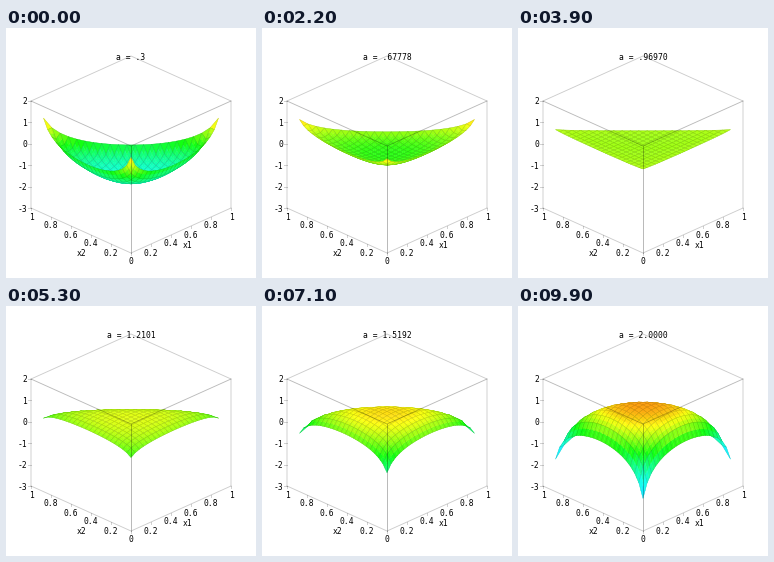
Recreate the animation shown at these times as a matplotlib script. Size 250 px wide and 250 px high, loop 10000 ms.

```python
from math import lgamma

import matplotlib.pyplot as plt
import numpy as np
from matplotlib.animation import FuncAnimation
from matplotlib.collections import PolyCollection
from matplotlib.colors import hsv_to_rgb

SIZE, DPI = 250, 100
PX = 72 / DPI  # one pixel in points
N = 24         # grid cells along each axis
FRAMES = 100
A_MIN, A_MAX = 0.3, 2.0
Z_MIN, Z_MAX = -3, 2

plt.rcParams["font.family"] = "DejaVu Sans Mono"


def project(x1, x2, z):
    """Orthographic view along the diagonal, in pixels."""
    return 125 + 100 * (x1 - x2), 225 - 45 * (x1 + x2) - 21.4 * (z - Z_MIN)


def log_density(a, x1, x2):
    """Log of the symmetric Dirichlet density with three components."""
    const = lgamma(3 * a) - 3 * lgamma(a)
    return const + (a - 1) * np.log(x1 * x2 * (1 - x1 - x2))


def color(z):
    """Orange for high values through green to cyan for low ones."""
    hue = (95 - 110 * np.tanh(0.62 * (z - 0.5))) / 360
    return (*hsv_to_rgb((hue, 0.93, 1)), 1)


# Cells inside the simplex, farthest first; those on the rim are triangles.
cells = []
for s in range(N - 2, 1, -1):
    for i in range(1, s):
        j = s - i
        corners = [(i, j), (i + 1, j), (i + 1, j + 1), (i, j + 1)]
        if s + 2 >= N:
            del corners[2]
        cells.append(np.array(corners) / N)


def surface(a):
    """Filled pieces and outlines of all cells, in painting order."""
    verts, faces, edges = [], [], []
    for c in cells:
        z = log_density(a, c[:, 0], c[:, 1])
        pts = np.column_stack([*project(c[:, 0], c[:, 1], z), z])
        if len(c) == 4:
            mid = pts.mean(axis=0)
            half = (pts + np.roll(pts, -1, axis=0)) / 2
            parts = [np.array([pts[k], half[k], mid, half[k - 1]])
                     for k in range(4)]
        else:
            parts = [pts]
        for p in parts:
            rgba = color(p[:, 2].mean())
            verts.append(p[:, :2])
            faces.append(rgba)
            edges.append(rgba)
        verts.append(pts[:, :2])
        faces.append((0, 0, 0, 0))
        edges.append((0, 0, 0, 0.2))
    return verts, faces, edges


fig = plt.figure(figsize=(SIZE / DPI, SIZE / DPI), dpi=DPI, facecolor="white")
ax = fig.add_axes([0, 0, 1, 1])
ax.set(xlim=(0, SIZE), ylim=(SIZE, 0))
ax.axis("off")


def line(points, alpha=0.2, zorder=1):
    xs, ys = zip(*points)
    ax.plot(xs, ys, color="black", alpha=alpha, lw=0.9 * PX, zorder=zorder)


def label(x, y, text, ha="center"):
    return ax.text(x, y, text, fontsize=8 * PX, ha=ha, va="center_baseline",
                   color="black", zorder=4)


# Box: outline behind the surface, nearest edges in front of it.
low = [project(x, y, Z_MIN) for x, y in ((0, 1), (0, 0), (1, 0))]
top = [project(x, y, Z_MAX) for x, y in ((0, 1), (0, 0), (1, 0), (1, 1))]
line(low)
line([low[0], top[0], top[3], top[2], low[2]])
line(top[:3], 0.27, 3)
line([top[1], low[1]], 0.3, 3)

for z in range(Z_MIN, Z_MAX + 1):
    x, y = project(0, 1, z)
    line([(x - 3, y), (x, y)])
    label(x - 4, y, str(z), "right")

for t in np.linspace(0, 1, 6):
    for x1, x2 in {(t, 0), (0, t)}:
        x, y = project(x1, x2, Z_MIN)
        line([(x, y), (x, y + 2)])
        label(x, y + 8, f"{t:g}")

label(75.5, 224, "x2")
label(181.5, 217, "x1")
title = label(125, 28.5, "")

mesh = PolyCollection([], linewidths=0.4 * PX, zorder=2)
ax.add_collection(mesh, autolim=False)


def title_text(k, a):
    if k == 0:
        return "a = .3"
    return "a = " + (f"{a:.4f}" if a >= 1 else f"{a:.5f}"[1:])


def update(k):
    a = A_MIN + (A_MAX - A_MIN) * k / (FRAMES - 1)
    verts, faces, edges = surface(a)
    mesh.set_verts(verts)
    mesh.set_facecolor(faces)
    mesh.set_edgecolor(edges)
    title.set_text(title_text(k, a))
    return mesh, title


anim = FuncAnimation(fig, update, frames=FRAMES, interval=100,
                     repeat=True, repeat_delay=0, blit=False)
plt.show()
```
